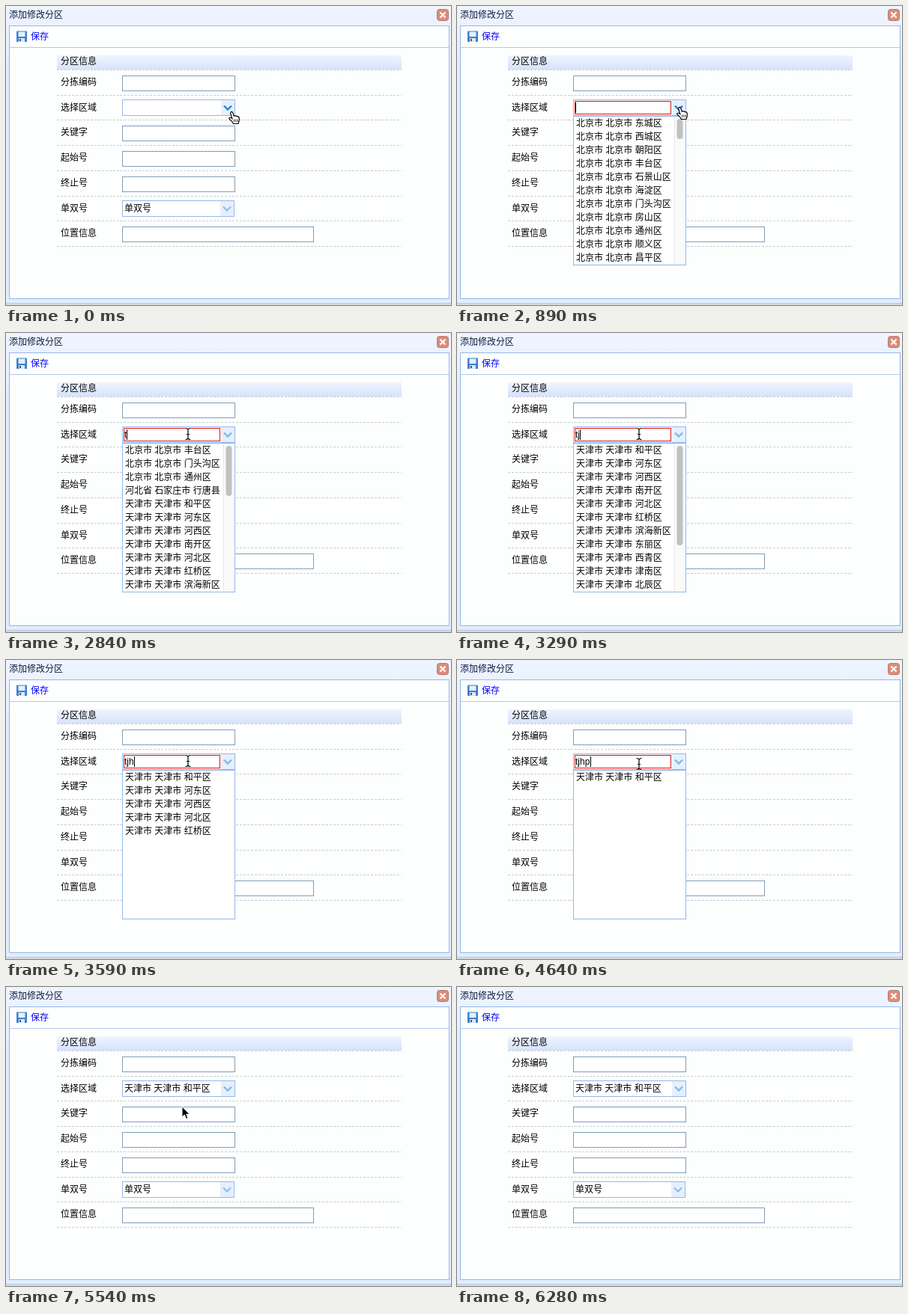
These frames come from a looping animation (594 px wide and 400 px high, 6710 ms). An HTML page:

```html
<!DOCTYPE html>
<html lang="zh-CN">
<head>
<meta charset="utf-8">
<style>
html, body { margin: 0; width: 100%; height: 100%; overflow: hidden; background: #fff; }
svg { display: block; font: 12px "Liberation Sans", "Noto Sans CJK SC", sans-serif; white-space: pre; }
</style>
</head>
<body>
<svg id="stage" width="594" height="400" viewBox="0 0 594 400">
  <defs>
    <linearGradient id="win" x2="0" y2="1">
      <stop stop-color="#eff5ff"/><stop offset=".2" stop-color="#e2edff"/>
    </linearGradient>
    <linearGradient id="head" x2="0" y2="1">
      <stop stop-color="#eff5ff"/><stop offset="1" stop-color="#d5e2fc"/>
    </linearGradient>
  </defs>
  <g id="form"></g>
  <g id="live"></g>
</svg>
<script>
const LOOP = 6710;
const BLUE = '#95b8e7', STEEL = '#7f9db9';

const fill = (x, y, w, h, color, extra = '') =>
  `<rect x="${x}" y="${y}" width="${w}" height="${h}" fill="${color}" ${extra}/>`;
const box = (x, y, w, h, color, inside = '#fff') =>
  fill(x + .5, y + .5, w - 1, h - 1, inside, `stroke="${color}"`);
const text = (x, y, s, color = '#000') => `<text x="${x}" y="${y}" fill="${color}">${s}</text>`;
const line = (d, color, width = 1, extra = '') =>
  `<path d="${d}" fill="none" stroke="${color}" stroke-width="${width}" ${extra}/>`;

const combo = (x, y, w, color) =>
  box(x, y, w, 22, BLUE) + fill(x + w - 19, y + 1, 18, 20, '#e6effd') +
  line(`M${x + w - 15} ${y + 8.5}l5 5 5-5`, color, 2.4);

function form() {
  const labels = ['分拣编码', '选择区域', '关键字', '起始号', '终止号', '单双号', '位置信息'];
  const base = [106, 140, 173, 207, 241, 275, 308];
  const rules = [85, 119, 152, 186, 220, 254, 287, 321];
  return fill(0, 0, 594, 397, 'url(#win)') +
    fill(0, 397, 594, 1, '#bccbe0') + fill(0, 398, 594, 2, '#d6dae0') +
    box(4, 26, 588, 366, BLUE, '#fdfefe') + fill(5, 55, 586, 1, '#b0c9e8') +
    text(4, 16, '添加修改分区', '#0e1a3f') +
    // close button
    fill(575.5, 4.5, 15, 15, '#de8c78', 'rx="3" stroke="#b57a6c"') +
    line('M579.5 8.5l7 7m0-7l-7 7', '#fff', 2.2) +
    // save button
    fill(14, 33.5, 14, 14.5, '#3f80cc', 'rx="1"') +
    fill(16.5, 34.5, 9, 6.5, '#e4f0fb') + fill(17, 43, 8, 5, '#dfe6ee') +
    fill(18, 44, 2, 3, '#2c5c9c') + text(33, 45, '保存', '#00f') +
    fill(68, 66, 460, 19, 'url(#head)') + text(73, 78, '分区信息') +
    labels.map((s, i) => text(73, base[i], s)).join('') +
    rules.map(y => line(`M68 ${y + .5}H151M152 ${y + .5}H528`, '#ccc', 1, 'stroke-dasharray="3 2"')).join('') +
    [93, 160, 194, 228].map(y => box(155, y, 151, 21, STEEL)).join('') +
    box(155, 295, 256, 21, STEEL) +
    combo(155, 260, 150, '#8fc3ea') + text(158, 275, '单双号');
}

const beijing = s => s.split(' ').map(n => '北京市 北京市 ' + n);
const tianjin = s => s.split(' ').map(n => '天津市 天津市 ' + n);
const all = beijing('东城区 西城区 朝阳区 丰台区 石景山区 海淀区 门头沟区 房山区 通州区 顺义区 昌平区');
const matchT = [...beijing('丰台区 门头沟区 通州区'), '河北省 石家庄市 行唐县',
  ...tianjin('和平区 河东区 河西区 南开区 河北区 红桥区 滨海新区')];
const matchTJ = tianjin('和平区 河东区 河西区 南开区 河北区 红桥区 滨海新区 东丽区 西青区 津南区 北辰区');
const matchTJH = tianjin('和平区 河东区 河西区 河北区 红桥区');
const picked = tianjin('和平区');

// Tracks: [start time, values...]
const lists = [[0, null], [890, all, 27], [2840, matchT, 67], [3290, matchTJ, 133],
  [3590, matchTJH, 0], [4040, picked, 0], [5390, null]];
const typed = [[0, ''], [2540, 't'], [2990, 'tj'], [3440, 'tjh'], [3740, 'tjhp'], [5390, picked[0]]];
const carets = [[0, 0], [890, 158], [1340, 0], [1790, 158], [2240, 0], [2540, 161], [2990, 164],
  [3440, 171], [3740, 178], [4190, 0], [4640, 178], [5090, 0]];
const pointer = [[0, 'hand', 299, 141], [150, 'hand', 298, 140], [300, 'hand', 296, 137],
  [440, 'hand', 295, 135], [1340, 'beam', 281, 138], [1490, 'beam', 262, 136],
  [1640, 'beam', 249, 135], [1790, 'beam', 243, 135], [4640, 'beam', 243, 139],
  [4790, 'beam', 241, 147], [4940, 'beam', 239, 155], [5090, 'beam', 237.5, 160],
  [5540, 'arrow', 235, 160], [5690, 'arrow', 250, 174], [5840, 'arrow', 320, 233],
  [5990, 'arrow', 428, 313], [6140, 'arrow', 533, 384], [6280, 'none', 0, 0]];
const at = (track, t) => track.findLast(k => k[0] <= t);

const beam = 'M-3.5-7.5Q0-7.5 0-5.5V5.5Q0 7.5-3.5 7.5M3.5-7.5Q0-7.5 0-5.5M0 5.5Q0 7.5 3.5 7.5M-2 .5H2';
const shapes = {
  hand: `<path d="M1 1Q2.5-.5 3.6 1.5L5.2 6Q6.5 5 7.5 6.3Q9 5.5 10 7Q11.7 6.4 12.2 8.5Q12.6 11 12 13L11 16.5H4.5Q3 13 .2 11.2Q-2 9.4-.8 8.4Q.6 7.8 2.8 9.6L.7 2.5Z"
    fill="#fff" stroke="#000" stroke-width="1.2"/>` + line('M5.5 10.5v3.5m2.2-3.5v3.5m2.2-3.5v3.5', '#000', .8),
  beam: line(beam, '#fff', 2.4) + line(beam, '#000', 1.2),
  arrow: '<path d="M0 0V14L3.3 11L5.6 16.4L8 15.4L5.7 10.2H10Z" stroke="#fff"/>',
  none: ''
};

function dropdown(rows, thumb, hover) {
  return box(155, 147, 151, 200, BLUE) +
    (hover ? fill(156, 148, 149, 18, '#e6effc') : '') +
    rows.map((s, i) => text(159, 161 + 18 * i, s)).join('') +
    (thumb ? fill(290, 148, 15, 198, '#fafafa') + fill(290, 148, 1, 198, '#e7e7e7') +
      fill(293.5, 151, 8, thumb, '#c1c1c1', 'rx="4"') : '');
}

function live(t) {
  const [, rows, thumb] = at(lists, t);
  const caret = at(carets, t)[1];
  const [, kind, x, y] = at(pointer, t);
  return combo(155, 125, 151, t < 1340 ? '#1f86d2' : '#7dbbe8') +
    (t >= 890 && t < 5240 ? box(157, 127, 129, 18, '#e01010') : '') +
    text(158, 140, at(typed, t)[1]) +
    (caret ? fill(caret, 129, 1, 14, '#000') : '') +
    (rows ? dropdown(rows, thumb, t >= 4940) : '') +
    `<g transform="translate(${x} ${y})">${shapes[kind]}</g>`;
}

const layer = document.getElementById('live');
document.getElementById('form').innerHTML = form();
let shown = '';
function tick() {
  const markup = live(performance.now() % LOOP);
  if (markup !== shown) layer.innerHTML = shown = markup;
  requestAnimationFrame(tick);
}
tick();
</script>
</body>
</html>
```
